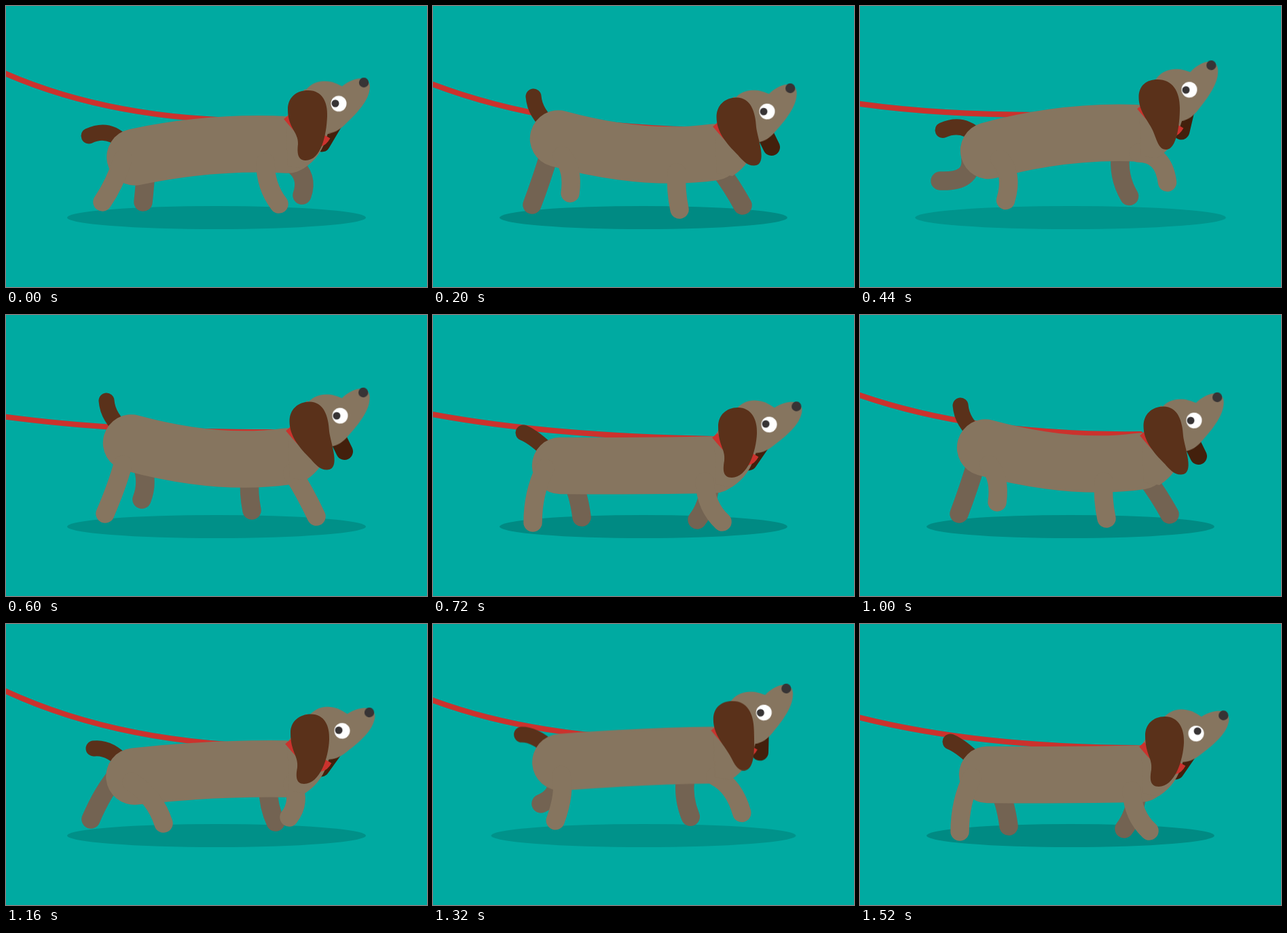
Animation of 620x413 px, one loop 1.6 s. Source, as an HTML page without scripts:

```html
<!DOCTYPE html>
<html lang="en">
<head>
<meta charset="utf-8">
<title>Walking dog</title>
<style>
html, body { margin: 0; width: 100%; height: 100%; overflow: hidden; background: #00aaa1; }
svg { display: block; width: 100%; height: 100%; }

:root { --coat: #86755f; --coat-far: #736352; --ear: #5a311a; --ear-far: #43200c; --red: #cb322d; --ink: #373435; }

.line { fill: none; stroke-linecap: round; }
.leg { stroke: var(--coat); stroke-width: 27.5; }
.far { stroke: var(--coat-far); }
.coat { fill: var(--coat); }

/* Motion runs in 40 ms steps: 400 ms per stride, 800 ms per full walk cycle. */
.stride { animation: 400ms steps(1) infinite; }
.walk { animation: 800ms steps(4) infinite; }
.clip { animation: 1600ms steps(4) infinite; }

#leash { animation-name: leash; stroke: var(--red); stroke-width: 8; }
#shadow { animation-name: shadow; transform-origin: 310px 311px; }
.bob { animation-name: bob; }
#tail { animation-name: tail; stroke: var(--ear); stroke-width: 23; }
#body { animation-name: body; stroke: var(--coat); stroke-width: 83.5; }
#neck { animation-name: neck; }
#head { animation-name: head; }
#pupil { animation-name: pupil; }
#ear { animation-name: ear; fill: var(--ear); }
#farEar { animation-name: farEar; stroke: var(--ear-far); stroke-width: 25; }
#backNear { animation-name: backNear; }
#backFar { animation-name: backFar; }
#frontNear { animation-name: frontNear; }
#frontFar { animation-name: frontFar; }

@keyframes leash {
  0% { d: path("M-6,97Q170,175 413,168"); animation-timing-function: steps(1); }
  2.5% { d: path("M-6,100Q170,170 413,156"); }
  12.5% { d: path("M-6,113Q170,181 413,182"); animation-timing-function: steps(3); }
  20% { d: path("M-6,129Q170,180 413,182"); animation-timing-function: steps(3); }
  27.5% { d: path("M-6,143Q170,168 413,156"); }
  37.5% { d: path("M-6,149Q170,173 413,172"); animation-timing-function: steps(3); }
  45% { d: path("M-6,145Q170,178 413,182"); animation-timing-function: steps(3); }
  52.5% { d: path("M-6,135Q170,176 413,155"); }
  62.5% { d: path("M-6,116Q170,178 413,175"); }
  72.5% { d: path("M-6,96Q170,179 413,180"); animation-timing-function: steps(2); }
  77.5% { d: path("M-6,100Q170,172 413,156"); }
  87.5% { d: path("M-6,120Q170,180 413,182"); animation-timing-function: steps(3); }
  95%, 100% { d: path("M-6,136Q170,181 413,182"); }
}
@keyframes shadow {
  0%, 100% { transform: scaleX(1); opacity: .15; animation-timing-function: steps(1); }
  5% { transform: scaleX(1.04); opacity: .13; }
  25%, 40% { transform: scaleX(.963); opacity: .185; animation-timing-function: steps(1); }
  45% { transform: scaleX(1); opacity: .15; animation-timing-function: steps(2); }
  55% { transform: scaleX(1.04); opacity: .13; }
  75% { transform: scaleX(1); opacity: .15; animation-timing-function: steps(3); }
  90% { transform: scaleX(.963); opacity: .185; animation-timing-function: steps(2); }
}
@keyframes bob {
  0%, 55%, 100% { transform: translateY(0); }
  75% { transform: translateY(-7px); animation-timing-function: steps(3); }
  90% { transform: translateY(0); }
}
@keyframes tail {
  0%, 100% { d: path("M122,191Q150,178 172,200"); }
  10%, 20% { d: path("M122,182.5Q150,170 172,191"); animation-timing-function: steps(3); }
  50% { d: path("M148,133Q150,158 175,178"); animation-timing-function: steps(3); }
  80% { d: path("M133,173Q150,180 175,205"); }
  90% { d: path("M129,183Q152,180 175,205"); }
}
@keyframes body {
  0%, 100% { d: path("M190,222Q305,198 415,204"); }
  10%, 20% { d: path("M189.5,212.5Q303,182 412,187"); animation-timing-function: steps(3); }
  50% { d: path("M184.5,195Q310,229 413,215"); animation-timing-function: steps(3); }
  80% { d: path("M187.5,221.5Q305,222.5 414,220"); }
  90% { d: path("M189,224Q305,211.5 412,213"); }
}
@keyframes neck {
  0%, 100% { transform: translate(0, 0); }
  10%, 20% { transform: translate(-1px, -15px); animation-timing-function: steps(3); }
  50% { transform: translate(3px, 11px); animation-timing-function: steps(3); }
  80% { transform: translate(2px, 14px); }
  90% { transform: translate(2px, 10px); }
}
@keyframes head {
  0%, 100% { transform: translate(490px, 143.5px) rotate(0deg); }
  10%, 20% { transform: translate(485px, 123px) rotate(-8deg); animation-timing-function: steps(3); }
  50% { transform: translate(492px, 155px) rotate(-5deg); animation-timing-function: steps(3); }
  80% { transform: translate(495px, 161px) rotate(6.5deg); }
  90% { transform: translate(495px, 157px) rotate(6deg); }
}
@keyframes pupil {
  0% { transform: translate(-5px, -.3px); animation-timing-function: steps(1); }
  82.5% { transform: translate(-5px, -.3px); animation-timing-function: steps(3); }
  90%, 100% { transform: translate(1.7px, -3.8px); }
}
@keyframes ear {
  0%, 100% { d: path("M415,152C415,134 428,124 445,124C466,124 474,142 473,162C472,190 464,227 441,227C428,227 429,212 430,203C431,185 415,180 415,152Z"); }
  10%, 20% { d: path("M410.5,134C410.5,117 422,108 438,108C460,108 471,125 471,150C471,175 466,211 451,211C441,211 438,200 434,190C428,171 410.5,158 410.5,134Z"); animation-timing-function: steps(3); }
  50% { d: path("M417.5,163C417.5,146 430,134.5 447,134.5C468,134.5 475,156 476,178C478,195 494,234 473,234.5C463,235 456,227 449,219C432,202 417.5,185 417.5,163Z"); animation-timing-function: steps(3); }
  80% { d: path("M420,164C420,147 432,136 449,136C469,136 478,154 477,174C476,201 463,239 440,239C426,239 427,226 429,214C431,197 420,192 420,164Z"); }
  90% { d: path("M419,160C419,143 432,132.5 449,132.5C469,132.5 477,150 476,170C475,197 462,235 439,235C426,235 427,222 429,211C431,194 419,188 419,160Z"); }
}
@keyframes farEar {
  0%, 100% { d: path("M484,170L465,202"); }
  10%, 20% { d: path("M481,150L473,184"); animation-timing-function: steps(3); }
  50% { d: path("M485,180L498.5,207.5"); animation-timing-function: steps(3); }
  80% { d: path("M485,187L465,216"); }
  90% { d: path("M485,183L464,212"); }
}
@keyframes backNear {
  0%, 100% { d: path("M172,225Q160,262 142,288"); animation-timing-function: steps(1); }
  5% { d: path("M164,230Q167,261 131.5,263.5"); }
  25% { d: path("M190,220Q207,240 202,275"); animation-timing-function: steps(3); }
  40% { d: path("M190,232Q217,255 225,292"); animation-timing-function: steps(1); }
  45% { d: path("M185,232Q220,255 232,293"); animation-timing-function: steps(2); }
  55% { d: path("M206,225Q226,247 214.5,285.5"); }
  75% { d: path("M172,220Q164,250 146,292"); animation-timing-function: steps(3); }
  90% { d: path("M165,225Q147,262 147,305"); animation-timing-function: steps(2); }
}
@keyframes backFar {
  0%, 100% { d: path("M206,240Q205,260 202,288"); animation-timing-function: steps(1); }
  5% { d: path("M205,235Q206,260 194,280"); }
  25% { d: path("M172,215Q160,255 146,292"); animation-timing-function: steps(3); }
  40% { d: path("M165,222Q143,258 135,298"); animation-timing-function: steps(1); }
  45% { d: path("M165,220Q143,245 125,287"); animation-timing-function: steps(2); }
  55% { d: path("M163,225Q166,259 118,257"); }
  75% { d: path("M200,220Q210,245 200,271"); animation-timing-function: steps(3); }
  90% { d: path("M200,235Q214,258 219,297"); animation-timing-function: steps(2); }
}
@keyframes frontNear {
  0%, 100% { d: path("M382,230Q382,265 402,291"); animation-timing-function: steps(1); }
  5% { d: path("M383,215Q379,253 400.5,283.5"); }
  25% { d: path("M359,245Q357,270 363,299"); animation-timing-function: steps(3); }
  40% { d: path("M412,245Q408,285 391,303"); animation-timing-function: steps(1); }
  45% { d: path("M422,235Q434,262 417,284"); animation-timing-function: steps(2); }
  55% { d: path("M410,216Q447,216 452.5,259"); }
  75% { d: path("M422,232Q440,260 457,296"); animation-timing-function: steps(3); }
  90% { d: path("M400,245Q402,282 426,304"); animation-timing-function: steps(2); }
}
@keyframes frontFar {
  0%, 100% { d: path("M422,232Q446,250 436,278"); animation-timing-function: steps(1); }
  5% { d: path("M420,220Q447,229 450,258"); }
  25% { d: path("M422,240Q440,264 456,293"); animation-timing-function: steps(3); }
  40% { d: path("M396,242Q398,278 418,299"); animation-timing-function: steps(1); }
  45% { d: path("M386,240Q386,268 397,291"); animation-timing-function: steps(2); }
  55% { d: path("M384,215Q379,250 396.5,279.5"); }
  75% { d: path("M359,240Q357,262 362,287"); animation-timing-function: steps(3); }
  90% { d: path("M408,250Q404,282 389,301"); animation-timing-function: steps(2); }
}
</style>
</head>
<body>
<svg viewBox="0 0 620 413">
  <g id="shadow" class="walk"><ellipse cx="310" cy="311" rx="220" ry="17"/></g>
  <path id="leash" class="line clip"/>
  <path id="backFar" class="line leg far walk"/>
  <path id="frontFar" class="line leg far walk"/>

  <g class="bob walk">
    <path id="tail" class="line stride"/>
    <path id="farEar" class="line stride"/>
    <path id="body" class="line stride"/>
  </g>

  <path id="backNear" class="line leg walk"/>
  <path id="frontNear" class="line leg walk"/>

  <g class="bob walk">
    <g id="neck" class="stride">
      <path class="coat" d="M412,165L440,122L488,150L474,187Q465,222 438,239L415,235Z"/>
      <path d="M413,163C438,193 460,216 473,192" fill="none" stroke="var(--red)" stroke-width="10"/>
    </g>
    <g id="head" class="stride">
      <path class="coat" d="M-60,5C-52,-26 -36,-33 -20,-33C-8,-33 -2,-28.5 5,-25.5C15,-33 22,-36.5 32,-37C44,-38 48,-28 45,-18C42,-2 25,16 10,30C0,40 -8,43 -16,44L-40,40Z"/>
      <circle cx="37" cy="-31" r="7.2" fill="var(--ink)"/>
      <circle r="11.5" fill="#fff"/>
      <circle id="pupil" class="clip" r="5.5" fill="var(--ink)"/>
    </g>
    <path id="ear" class="stride"/>
  </g>
</svg>
</body>
</html>
```
